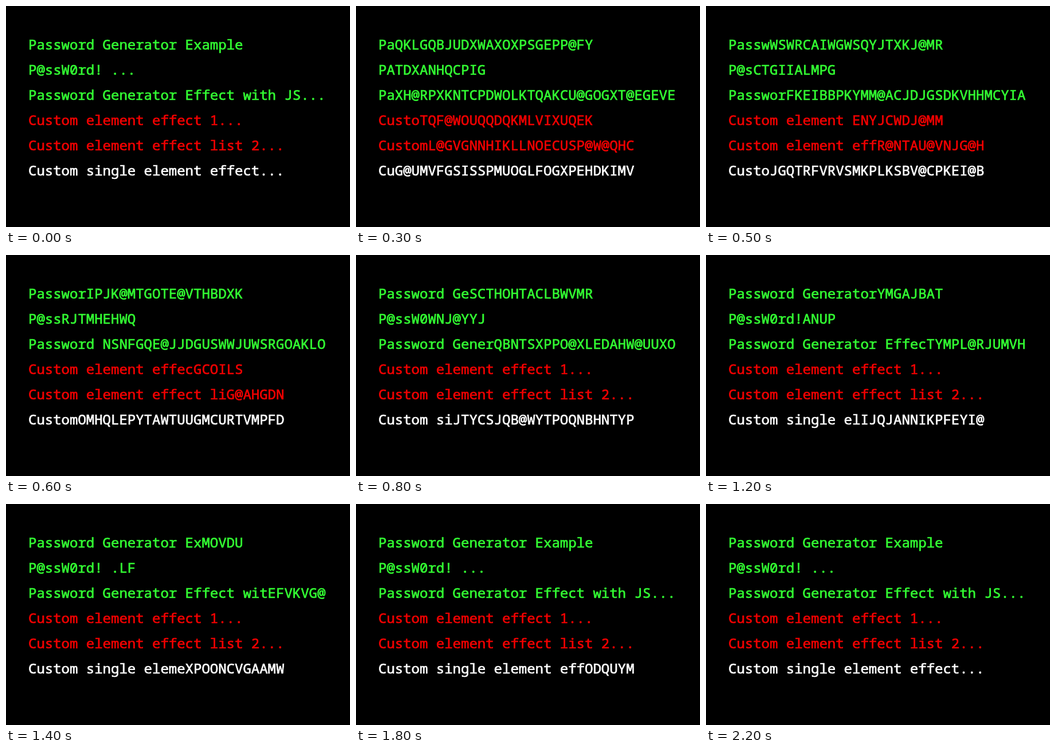
Recreate the animation shown at these times as an HTML page. Size 600 px wide and 386 px high, loop 2.6 s.

```html
<!DOCTYPE html>
<html lang="en">
<head>
<meta charset="utf-8">
<title>Password generator effect</title>
<style>
  html, body { margin: 0; height: 100%; overflow: hidden; background: #000; }
  svg { display: block; width: 600px; height: 386px; }
  text {
    font: 400 24px "Roboto Mono", "Noto Sans Mono", monospace;
    white-space: pre;
    stroke: currentColor;
    stroke-width: 0.7px;
    fill: currentColor;
  }
</style>
</head>
<body>
<svg viewBox="0 0 600 386"></svg>
<script>
const LOOP = 2600, STEP = 100, BEGIN = 300;
const GREEN = '#33ff33', RED = '#f20000', WHITE = '#fff';

// Reveal start and duration are in ms.
const lines = [
  { text: 'Password Generator Example', color: GREEN, start: 165, duration: 1470 },
  { text: 'P@ssW0rd! ...', color: GREEN, start: 116, duration: 1470 },
  { text: 'Password Generator Effect with JS...', color: GREEN, start: 202, duration: 1470 },
  { text: 'Custom element effect 1...', color: RED, start: 200, duration: 500 },
  { text: 'Custom element effect list 2...', color: RED, start: 200, duration: 500 },
  { text: 'Custom single element effect...', color: WHITE, start: 169, duration: 1975 },
];

const svg = document.querySelector('svg');
lines.forEach((line, row) => {
  line.node = document.createElementNS(svg.namespaceURI, 'text');
  line.node.setAttribute('x', 39);
  line.node.setAttribute('y', 76.3 + row * 44);
  line.node.style.color = line.color;
  svg.append(line.node);
});

// Seeded random character from "@" to "Y".
function randomChar(seed) {
  const x = Math.sin(seed * 12.9898) * 43758.5453;
  return String.fromCharCode(64 + Math.floor((x - Math.floor(x)) * 26));
}

function scramble({ text, start, duration }, row, time) {
  if (time < BEGIN) return text;
  const shown = Math.floor((time - start) / duration * text.length);
  return [...text]
    .map((char, i) => i < shown ? char : randomChar(time * 7 + row * 37 + i + 1))
    .join('');
}

function draw(now) {
  const time = Math.floor(now % LOOP / STEP) * STEP;
  lines.forEach((line, row) => {
    line.node.textContent = scramble(line, row, time);
  });
  requestAnimationFrame(draw);
}
draw(0);
</script>
</body>
</html>
```
